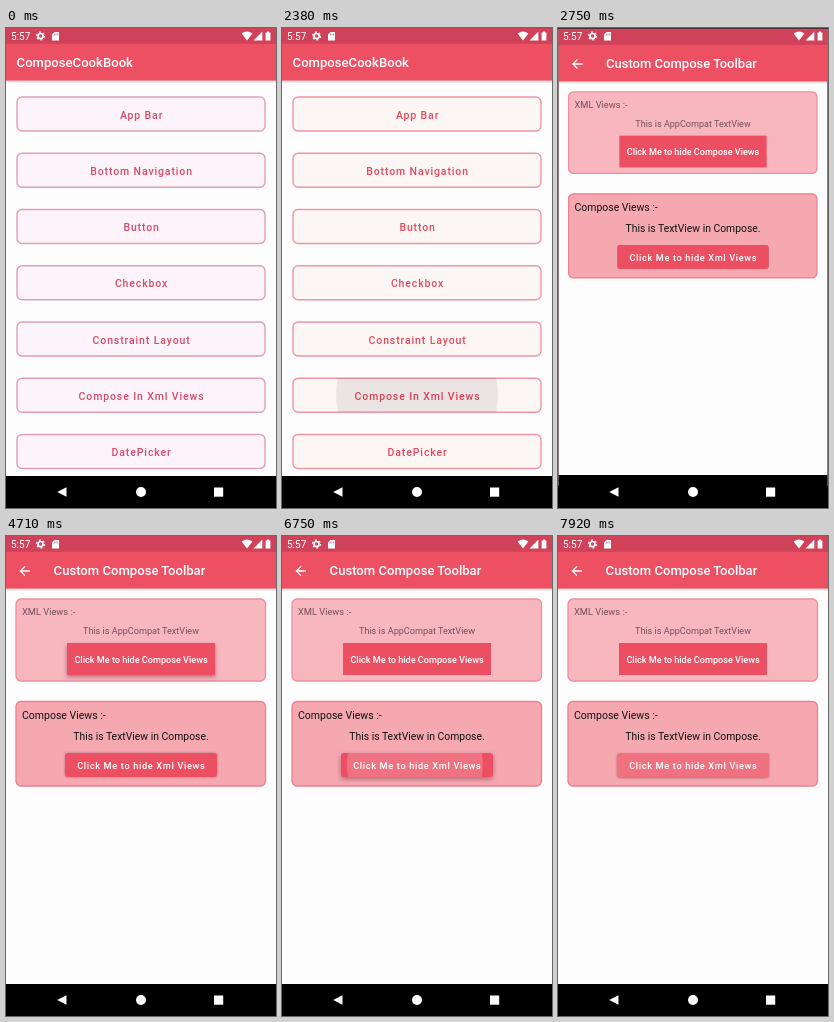
Write an HTML page that moves like this. It is 270 px wide and 480 px high and loops after 8000 ms.

```html
<!DOCTYPE html>
<html lang="en">
<head>
<meta charset="utf-8">
<title>Compose in XML</title>
<style>
html, body { margin: 0; width: 100%; height: 100%; overflow: hidden; background: #000; }
svg { display: block; width: 100vw; height: 100vh; }
text { font-family: Roboto, sans-serif; white-space: pre; }
.med { font-weight: 500; }
.mid { text-anchor: middle; }
.title { font-size: 13.1px; font-weight: 500; fill: #fff; }
.item { font-size: 10.5px; font-weight: 500; letter-spacing: .88px; }
</style>
</head>
<body>
<svg id="stage" viewBox="0 0 270 480">
  <defs>
    <clipPath id="rowClip"><rect x="11" y="350" width="248" height="34" rx="5"/></clipPath>
    <clipPath id="btnClip"><rect x="59" y="217" width="152" height="24" rx="3"/></clipPath>
    <linearGradient id="shade" x2="0" y2="1">
      <stop offset="0" stop-color="#000" stop-opacity=".16"/>
      <stop offset="1" stop-color="#000" stop-opacity="0"/>
    </linearGradient>
  </defs>
  <rect width="270" height="480" fill="#4a3036"/>

  <g id="list">
    <rect width="270" height="480" fill="#fdfdfd"/>
    <g id="rows"></g>
    <circle id="rowRipple" cx="135" cy="367" clip-path="url(#rowClip)" fill="#000" fill-opacity=".07"/>
    <g class="bars"></g>
    <text class="title" x="10.6" y="39">ComposeCookBook</text>
  </g>

  <g id="detail">
    <rect width="270" height="480" fill="#fdfdfd"/>
    <g id="xmlCard">
      <rect x="10" y="63" width="249.5" height="82" rx="5" fill="#f8b6bf" stroke="#ee8f9d" stroke-width="1.3"/>
      <g fill="#74505a">
        <text x="16" y="79" font-size="9.3">XML Views :-</text>
        <text class="mid" x="135" y="98" font-size="9.1">This is AppCompat TextView</text>
      </g>
      <rect id="xmlBtn" x="61" y="107" width="148" height="32" fill="#ec4f62"/>
      <text class="med mid" x="138" y="126.8" font-size="9.1" fill="#fff" dx="-3">Click Me to hide Compose Views</text>
    </g>
    <g id="composeCard">
      <rect x="10" y="165.5" width="249.5" height="84.5" rx="5" fill="#f5a8b0" stroke="#ec8090" stroke-width="1.3"/>
      <g fill="#111">
        <text x="16" y="183" font-size="10.5">Compose Views :-</text>
        <text class="mid" x="135" y="203.5" font-size="10.4">This is TextView in Compose.</text>
      </g>
      <rect id="composeBtn" x="59" y="217" width="152" height="24" rx="3" fill="#ec4f62"/>
      <g clip-path="url(#btnClip)"><circle id="btnRipple" cy="229" fill="#fff"/></g>
      <text class="med mid" x="135.3" y="232.6" font-size="9.2" letter-spacing=".65" fill="#fff">Click Me to hide Xml Views</text>
    </g>
    <g class="bars"></g>
    <path d="M24 35H14.6M19 30.4L14.4 35L19 39.6" fill="none" stroke="#fff" stroke-width="1.3"/>
    <text class="title" x="47.6" y="39.3">Custom Compose Toolbar</text>
  </g>

  <g id="system" fill="#fff">
    <rect y="458" width="270" height="22" fill="#000"/>
    <text x="5" y="11.8" font-size="10">5:57</text>
    <circle cx="34.5" cy="8" r="2.5" fill="none" stroke="#fff" stroke-width="1.7"/>
    <circle cx="34.5" cy="8" r="3.9" fill="none" stroke="#fff" stroke-width="1.2" stroke-dasharray="2.04 2.04"/>
    <path d="M48.6 4H53V12.4H46V6.6Z"/>
    <path d="M48.4 5.6V7.4M50 5.6V7.4M51.6 5.6V7.4" stroke="#d04259" stroke-width=".7"/>
    <path d="M235.6 5.6Q241 1.6 246.4 5.6L241 12.4Z"/>
    <path d="M256.4 3.6V12.4H247.6Z"/>
    <path d="M259.6 4.4H261V3.4H263V4.4H264.4V12.6H259.6Z"/>
    <path d="M60.5 459.2V468.8L51.2 464Z"/>
    <circle cx="135" cy="464" r="5"/>
    <rect x="208" y="459.5" width="9.2" height="9.2"/>
  </g>
</svg>
<script>
const LOOP = 8000;
const $ = id => document.getElementById(id);
const clamp = v => Math.min(1, Math.max(0, v));
const lerp = (a, b, k) => a + (b - a) * k;
const mix = (a, b, k) => `rgb(${a.map((v, i) => Math.round(lerp(v, b[i], k)))})`;
const set = (el, attrs) => { for (const k in attrs) el.setAttribute(k, attrs[k]); };

// Cubic through (x0,y0)..(x3,y3), solved for y at x
function bezier(x0, y0, x1, y1, x2, y2, x3, y3) {
  const at = (a, b, c, d, t) => {
    const u = 1 - t;
    return u * u * u * a + 3 * u * u * t * b + 3 * u * t * t * c + t * t * t * d;
  };
  return x => {
    let lo = 0, hi = 1;
    for (let i = 0; i < 24; i++) {
      const m = (lo + hi) / 2;
      if (at(x0, x1, x2, x3, m) < x) lo = m; else hi = m;
    }
    return at(y0, y1, y2, y3, lo);
  };
}
const standard = bezier(0, 0, .4, 0, .2, 1, 1, 1);
const rise = bezier(0, 0, .05, 0, .1333, .06, .1667, .4);
const settle = bezier(.1667, .4, .2083, .82, .25, 1, 1, 1);
const emphasized = x => x <= 0 ? 0 : x >= 1 ? 1 : x < .1667 ? rise(x) : settle(x);

const labels = ['App Bar', 'Bottom Navigation', 'Button', 'Checkbox',
  'Constraint Layout', 'Compose In Xml Views', 'DatePicker'];
$('rows').innerHTML = labels.map((s, i) => {
  const y = 69 + i * 56.25;
  return `<rect x="11" y="${y}" width="248" height="34" rx="5" stroke-width="1.4"/>
    <text class="item mid" x="135.6" y="${y + 21.6}">${s}</text>`;
}).join('');
const boxes = $('rows').querySelectorAll('rect');
const names = $('rows').querySelectorAll('text');

document.querySelectorAll('.bars').forEach(g => {
  g.innerHTML = `<rect y="52.5" width="270" height="3" fill="url(#shade)"/>
    <rect width="270" height="52.6" fill="#ed5063"/>
    <rect width="270" height="15.8" fill="#d04259"/>
    <rect y="448" width="270" height="32" fill="#000"/>`;
});

const OPEN = 2522;
const presses = [
  { start: 6665, up: 6890 },
  { start: 7710, up: 7950 }
];

const zoom = s => `translate(135 240) scale(${s}) translate(-135 -240)`;
const pulse = (t, a, b) => clamp((t - a) / 80) * (1 - clamp((t - b) / 110));
const shadow = (el, h) => {
  el.style.filter = h > 0 ? `drop-shadow(0 ${h}px ${h}px rgba(60,0,15,.38))` : 'none';
};

function draw(t) {
  // List page
  const tone = clamp(t / 840);
  const fill = mix([252, 244, 250], [252, 246, 245], tone);
  const line = mix([226, 160, 176], [239, 150, 163], tone);
  const ink = mix([217, 74, 104], [232, 72, 92], tone);
  boxes.forEach(b => set(b, { fill, stroke: line }));
  names.forEach(n => set(n, { fill: ink }));
  const tap = (t - 2340) / 225;
  set($('rowRipple'), { r: tap < 0 ? 0 : lerp(75, 131, standard(clamp(tap))) });

  // Page change
  const e = t - OPEN, k = emphasized(e / 400);
  const alpha = clamp((e - 50) / 50);
  set($('list'), { transform: zoom(lerp(1, 1.05, k)), display: alpha < 1 ? 'inline' : 'none' });
  set($('detail'), {
    transform: zoom(lerp(.85, 1, k)), opacity: alpha, display: alpha > 0 ? 'inline' : 'none'
  });

  // Cards
  const noCompose = t >= 4750 && t < 5590;
  const noXml = t >= 6860 && t < 7850;
  set($('composeCard'), {
    display: noCompose ? 'none' : 'inline',
    transform: `translate(0 ${noXml ? -102.5 : 0})`
  });
  set($('xmlCard'), { display: noXml ? 'none' : 'inline' });

  shadow($('xmlBtn'), 2 * Math.max(pulse(t, 4630, 4780), pulse(t, 5480, 5600)));
  shadow($('composeBtn'), .8 + 1.6 * pulse(t, 6590, 6900) + .5 * pulse(t, 7710, 7950));

  const p = presses.find(q => t >= q.start && t < q.up + 150);
  const grow = p ? standard(clamp((t - p.start) / 225)) : 0;
  set($('btnRipple'), {
    r: p ? lerp(46, 84, grow) : 0,
    cx: lerp(130, 135, grow),
    opacity: p ? .2 * clamp((t - p.start) / 75) * (1 - clamp((t - p.up) / 150)) : 0
  });
}

const began = performance.now();
function tick() {
  draw((performance.now() - began) % LOOP);
  requestAnimationFrame(tick);
}
draw(0);
requestAnimationFrame(tick);
</script>
</body>
</html>
```
